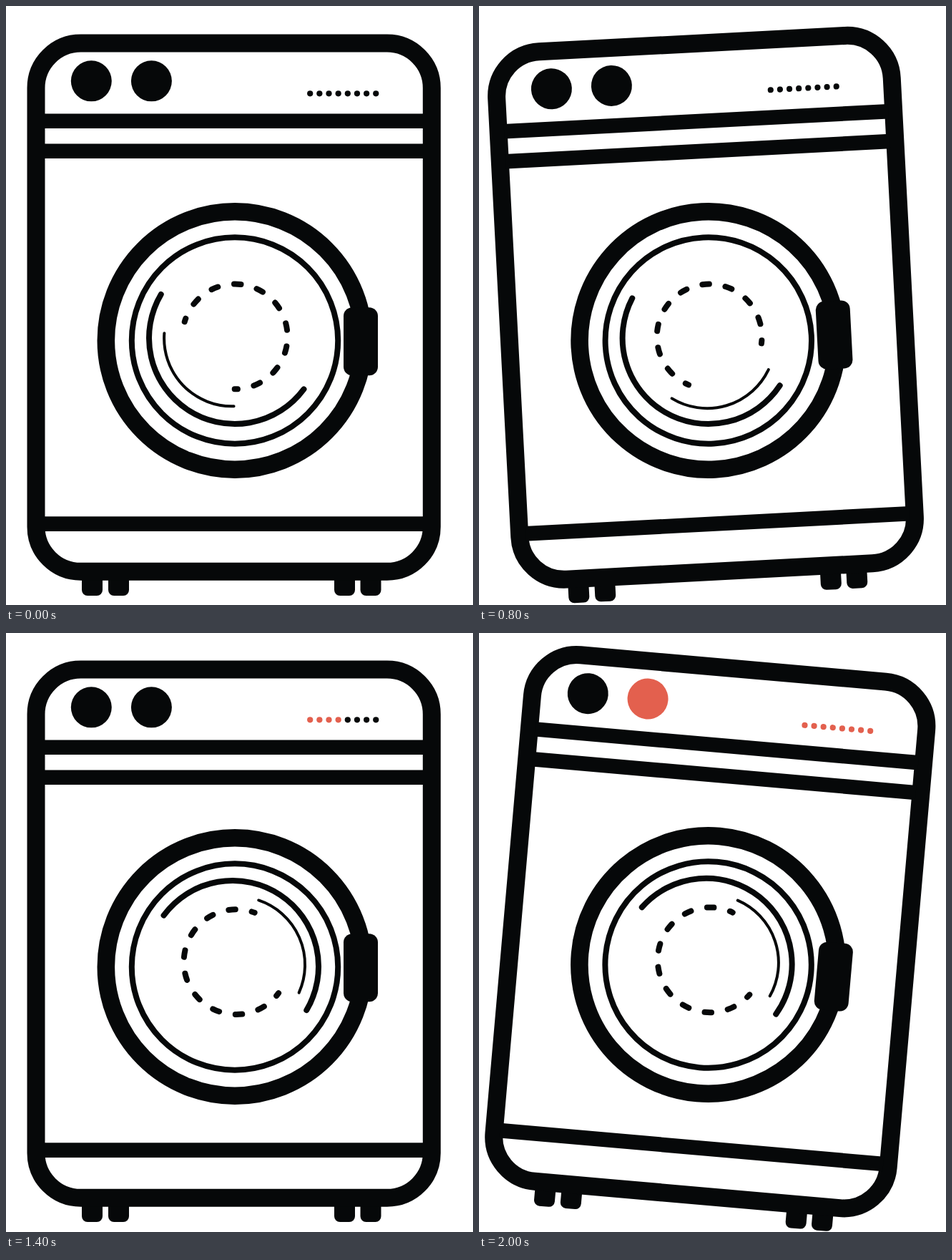
Write an HTML page that moves like this. It is 653 px wide and 837 px high and loops after 2200 ms.

```html
<!DOCTYPE html>
<html lang="en">
<head>
<meta charset="utf-8">
<title>Washing machine</title>
<style>
  html, body { margin: 0; width: 100%; height: 100%; overflow: hidden; background: #fff; }
  svg { display: block; width: 100%; height: 100%; }
  .line { fill: none; stroke: #060809; stroke-linecap: round; }
</style>
</head>
<body>
<svg viewBox="0 0 653 837" fill="#060809">
  <g id="machine">
    <g id="feet"></g>
    <rect x="42" y="52" width="553.3" height="738.3" rx="62.5" fill="#fff" stroke="#060809" stroke-width="25"/>
    <rect x="50" y="150.5" width="538" height="20.5"/>
    <rect x="50" y="192.5" width="538" height="20.5"/>
    <rect x="50" y="713.3" width="538" height="20.7"/>
    <circle cx="119.3" cy="104.8" r="28.5"/>
    <circle id="dial" cx="203.4" cy="104.8" r="28.5"/>
    <g id="lights"></g>
    <g transform="translate(320 467.5)">
      <circle class="line" r="180.2" stroke-width="24.6"/>
      <circle class="line" r="144.2" stroke-width="8"/>
      <g transform="translate(-1.5 -2)"><path class="line" id="thick" stroke-width="8"/></g>
      <g transform="translate(-0.4 -3.7)"><path class="line" id="thin" stroke-width="4"/></g>
      <g transform="translate(1 -6.4)"><path class="line" id="dashes" stroke-width="8"/></g>
    </g>
    <rect x="472" y="421.3" width="48" height="95" rx="12"/>
  </g>
</svg>
<script>
const BLACK = '#060809', RED = '#e3604e';
const STEP = 200, STEPS = 11, LIGHTS = 8, TURN = -20;
const FLIP = 5, LAST = STEPS - 1;
const $ = id => document.getElementById(id);

// The jolts, by step; the machine stands upright in between
const jolts = {
  4: { x: 0.8, y: 0, tilt: -3 },
  6: { x: 14, y: -21, tilt: 5 },
  8: { x: 1.5, y: -20, tilt: -5 },
  10: { x: 0.6, y: -4, tilt: 5 }
};

function add(parent, tag, attrs) {
  const el = document.createElementNS('http://www.w3.org/2000/svg', tag);
  for (const key in attrs) el.setAttribute(key, attrs[key]);
  return parent.appendChild(el);
}

// Clockwise arc around cx,cy, angles in degrees
function arc(cx, cy, r, from, to) {
  const point = deg => {
    const a = deg * Math.PI / 180;
    return `${cx + r * Math.cos(a)} ${cy + r * Math.sin(a)}`;
  };
  return `M${point(from)}A${r} ${r} 0 ${to - from > 180 ? 1 : 0} 1 ${point(to)}`;
}

const turn = (id, deg) => $(id).setAttribute('transform', `rotate(${deg})`);

for (const x of [106, 143, 459, 495.5])
  add($('feet'), 'rect', { x, y: 780, width: 29, height: 44, rx: 8 });

const lights = Array.from({ length: LIGHTS }, (_, i) =>
  add($('lights'), 'circle', { cx: 425.2 + 13.15 * i, cy: 122.3, r: 4.1 }));

// Each arc sits slightly off the pivot it turns around
$('thick').setAttribute('d', arc(1.5, -1.5, 120, 36.5, 210.6));
$('thin').setAttribute('d', arc(-3.5, 0.5, 95, 88.5, 184.3));

// Whole periods with half a dash at each end
const radius = 73.4, span = 254;
const period = radius * span * Math.PI / 180 / 10, dash = 9.5;
$('dashes').setAttribute('d', arc(-0.8, 0.8, radius, 196.4, 196.4 + span));
$('dashes').setAttribute('stroke-dasharray', `${dash} ${period - dash}`);
$('dashes').setAttribute('stroke-dashoffset', dash / 2);

function draw(time) {
  const n = Math.floor(time / STEP) % STEPS;
  const flipped = n >= FLIP;

  const rest = { x: 0, y: n > 2 && n < 8 ? -1 : 0, tilt: 0 };
  const { x, y, tilt } = jolts[n] || rest;
  $('machine').setAttribute('transform', `translate(${x} ${y}) rotate(${tilt} 320 467.5)`);

  // The thin arc starts one step late; the flip brings both in line, then they stop
  const turns = flipped ? Math.min(n + 1, 8) : n;
  turn('thick', flipped ? 180 : 0);
  turn('thin', TURN * (flipped ? turns : Math.max(0, n - 1)));
  turn('dashes', TURN * turns);

  const lit = 2 * (n - FLIP);
  lights.forEach((el, i) => el.setAttribute('fill', i < lit ? RED : BLACK));
  $('dial').setAttribute('fill', n === LAST ? RED : BLACK);
}

const start = performance.now();
function tick() {
  draw(performance.now() - start);
  requestAnimationFrame(tick);
}
tick();
</script>
</body>
</html>
```
